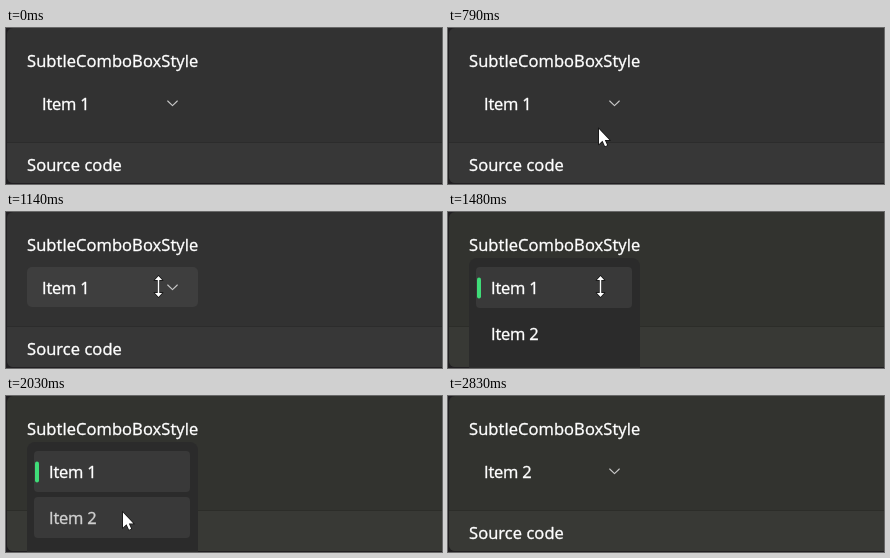
These frames come from a looping animation (436x156 px, 3.37 s). An HTML page with a canvas:

```html
<!DOCTYPE html>
<html lang="en">
<head>
<meta charset="utf-8">
<title>Subtle combo box</title>
<style>
html, body { margin: 0; width: 100%; height: 100%; overflow: hidden; background: #211f22; }
canvas { display: block; width: 436px; height: 156px; }
</style>
</head>
<body>
<canvas id="stage"></canvas>
<script>
const W = 436, H = 156, LOOP = 3370;
const canvas = document.getElementById('stage');
const ctx = canvas.getContext('2d');
const dpr = window.devicePixelRatio || 1;
canvas.width = W * dpr;
canvas.height = H * dpr;

// Pointer steps: start time, x, y, shape
const POINTER = [
  [0, 0, 0, ''],
  [580, 201, 139, 'arrow'],
  [650, 182, 121, 'arrow'],
  [720, 163, 108, 'arrow'],
  [790, 150.5, 100, 'arrow'],
  [860, 145, 92, 'arrow'],
  [930, 141, 82, 'arrow'],
  [1000, 142.5, 70, 'resize'],
  [1070, 149, 73, 'resize'],
  [1140, 152.5, 74.5, 'resize'],
  [1550, 147, 86, 'arrow'],
  [1620, 136, 100, 'arrow'],
  [1690, 123, 111, 'arrow'],
  [1760, 116.5, 115.5, 'arrow'],
  [2760, 191, 140, 'arrow'],
  [2830, 0, 0, '']
];

// Popup opacity steps
const POPUP = [[0, 0], [1210, 1], [2040, 0.5], [2100, 0.15], [2170, 0]];

function stepAt(steps, t) {
  let hit = steps[0];
  for (const s of steps) if (s[0] <= t) hit = s;
  return hit;
}

function box(x, y, w, h, r, color) {
  ctx.beginPath();
  ctx.roundRect(x, y, w, h, r);
  ctx.fillStyle = color;
  ctx.fill();
}

// A hairline stroke gives the text a slightly heavier weight.
function label(text, x, y, spacing, color = '#fff') {
  ctx.font = '16.5px "Open Sans", "Noto Sans", sans-serif';
  ctx.letterSpacing = spacing + 'px';
  ctx.textBaseline = 'alphabetic';
  ctx.fillStyle = ctx.strokeStyle = color;
  ctx.lineWidth = 0.35;
  ctx.lineJoin = 'round';
  ctx.fillText(text, x, y);
  ctx.strokeText(text, x, y);
}

const heading = (text, y) => label(text, 21, y, 0.07);
const item = (text, x, y, color) => label(text, x, y, -0.2, color);

function chevron() {
  ctx.beginPath();
  ctx.moveTo(161.7, 73);
  ctx.lineTo(166.5, 77.6);
  ctx.lineTo(171.3, 73);
  ctx.strokeStyle = '#c8c8c8';
  ctx.lineWidth = 1.1;
  ctx.lineCap = 'round';
  ctx.lineJoin = 'round';
  ctx.stroke();
}

function shape(x, y, points) {
  ctx.beginPath();
  for (const [dx, dy] of points) ctx.lineTo(x + dx, y + dy);
  ctx.closePath();
  ctx.lineJoin = 'miter';
  ctx.lineWidth = 1.4;
  ctx.strokeStyle = '#111';
  ctx.stroke();
  ctx.fillStyle = '#fff';
  ctx.fill();
}

const ARROW = [[0.5, 1], [0.5, 16], [4, 12.8], [6.5, 18.2],
  [8.7, 17.2], [6.3, 12], [10.9, 12]];
const half = [[0, -10.5], [3.6, -6.4], [0.8, -6.4], [0.8, 6.4], [3.6, 6.4], [0, 10.5]];
const RESIZE = half.concat(half.slice(1, -1).reverse().map(([x, y]) => [-x, y]));

function drawPage(t) {
  const warm = t >= 1480;
  ctx.fillStyle = '#211f22';
  ctx.fillRect(0, 0, W, H);
  box(1, 0, W, 155, [6, 0, 0, 6], warm ? '#32332f' : '#323232');
  box(1, 115, W, 40, [0, 0, 0, 6], warm ? '#383935' : '#373737');
  ctx.fillStyle = warm ? '#2c2d29' : '#2c2c2c';
  ctx.fillRect(1, 114, W, 1);
  heading('SubtleComboBoxStyle', 39);
  heading('Source code', 143);
  if (t >= 1140 && t < 1970) box(21, 55, 171, 40, 5, '#3e3e3e');
  item(t < 1970 ? 'Item 1' : 'Item 2', 36, 82);
  chevron();
}

function drawPopup(t, alpha, tipY) {
  if (!alpha) return;
  ctx.globalAlpha = alpha;
  box(21, 46, 171, 130, 8, '#2b2b2b');
  box(28, 55, 156, 41, 4, '#393939');
  if (t >= 1480 && tipY >= 100) box(28, 101, 156, 41, 4, '#393939');
  box(29, 65.5, 4, 21, 2, '#3fdc78');
  item('Item 1', 43, 82);
  item('Item 2', 43, 128, t >= 1970 ? '#d0d0d0' : '#fff');
  ctx.globalAlpha = 1;
}

function draw(t) {
  ctx.setTransform(dpr, 0, 0, dpr, 0, 0);
  const [, x, y, kind] = stepAt(POINTER, t);
  drawPage(t);
  drawPopup(t, stepAt(POPUP, t)[1], y);
  if (kind) shape(x, y, kind === 'arrow' ? ARROW : RESIZE);
}

let start = null;
function tick(now) {
  if (start === null) start = now;
  draw((now - start) % LOOP);
  requestAnimationFrame(tick);
}
draw(0);
requestAnimationFrame(tick);
</script>
</body>
</html>
```
